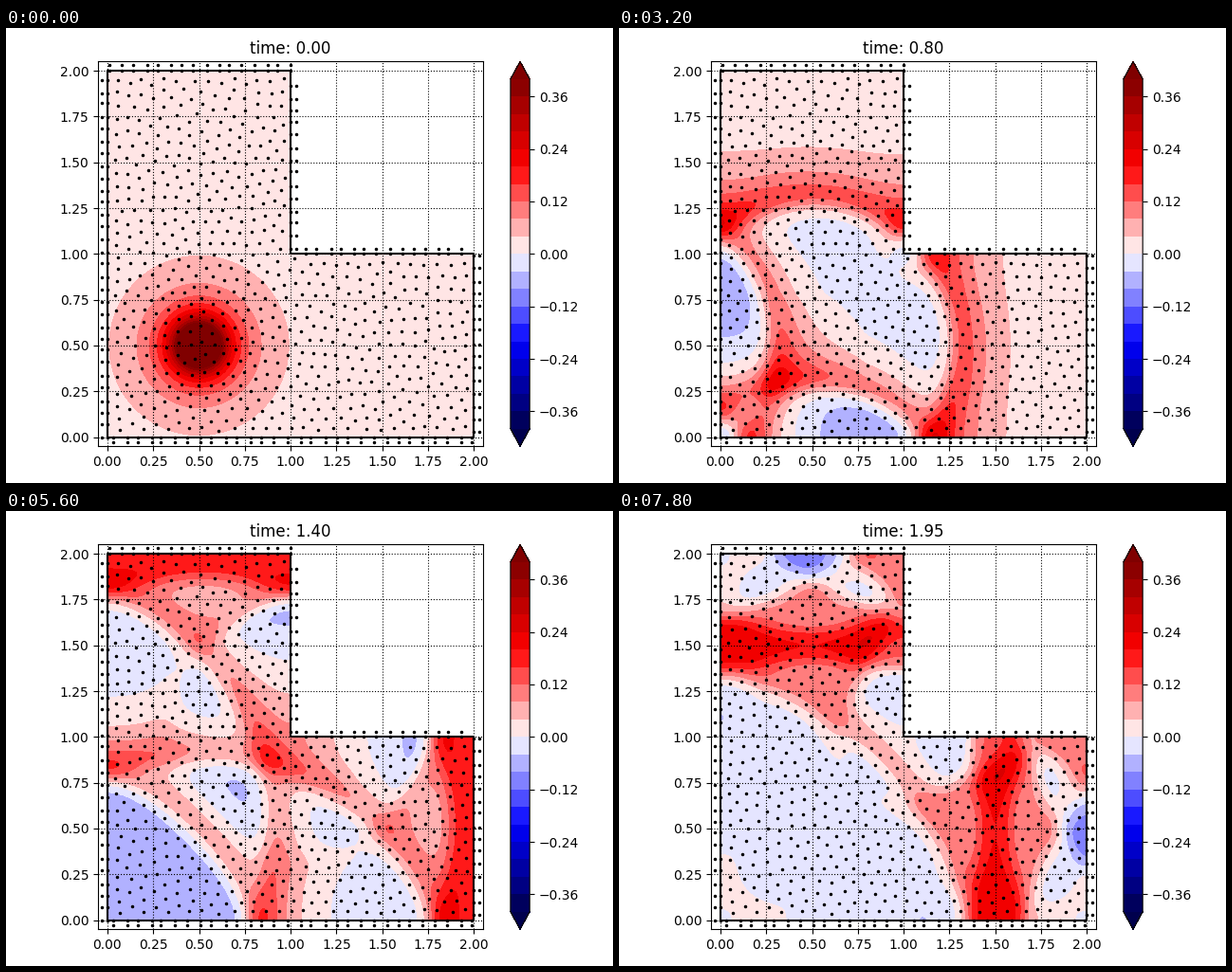
Animation of 640x480 px, one loop 8000 ms. Source, as a matplotlib script:

```python
import numpy as np
import matplotlib.pyplot as plt
from matplotlib.animation import FuncAnimation

W, H, DPI = 640, 480, 100
FRAMES, INTERVAL = 40, 200
DT_FRAME = 0.05

# Wave solver: free boundary, unit speed, vertex grid over the L-shaped domain
N = 200
STEP = 2.0 / N
SUB = 10
DT = DT_FRAME / SUB

axis = np.linspace(0, 2, N + 1)
X, Y = np.meshgrid(axis, axis)
outside = (X > 1 + STEP / 2) & (Y > 1 + STEP / 2)

cells = np.ones((N, N))
cells[N // 2:, N // 2:] = 0
padded = np.pad(cells, 1)
mass = (padded[1:, 1:] + padded[1:, :-1] + padded[:-1, 1:] + padded[:-1, :-1]) / 4
mass[mass == 0] = 1
edge_x = (padded[1:, 1:-1] + padded[:-1, 1:-1]) / 2
edge_y = (padded[1:-1, 1:] + padded[1:-1, :-1]) / 2


def laplacian(u):
    fx = edge_x * np.diff(u, axis=1)
    fy = edge_y * np.diff(u, axis=0)
    out = np.zeros_like(u)
    out[:, :-1] += fx
    out[:, 1:] -= fx
    out[:-1] += fy
    out[1:] -= fy
    return out / mass / STEP**2


def solve():
    r2 = (X - 0.5)**2 + (Y - 0.5)**2
    u = 1 / (1 + r2 / 0.1**2)
    prev = u + 0.5 * DT**2 * laplacian(u)
    fields = []
    for _ in range(FRAMES):
        fields.append(np.ma.array(u.copy(), mask=outside))
        for _ in range(SUB):
            u, prev = 2 * u - prev + DT**2 * laplacian(u), u
    return fields


# Scattered nodes: jittered boundary, ghosts just outside, relaxed interior
rng = np.random.default_rng(4)
SPACING = 0.0667


def side(start, end, normal):
    start, end = np.array(start), np.array(end)
    length = np.linalg.norm(end - start)
    n = int(round(length / SPACING)) + 1
    t = np.linspace(0, 1, n)
    t[1:-1] += rng.uniform(-0.15, 0.15, n - 2) / (n - 1)
    edge = start + t[:, None] * (end - start)
    return edge, edge + 0.029 * np.array(normal)


def inside(p):
    x, y = p[..., 0], p[..., 1]
    box = (x > 0.02) & (y > 0.02) & (x < 1.98) & (y < 1.98)
    return box & ((x < 0.98) | (y < 0.98))


def interior(edge, radius=0.052):
    pts = np.empty((3000, 2))
    n = len(edge)
    pts[:n] = edge
    for p in rng.uniform(0, 2, (24000, 2)):
        if inside(p) and ((pts[:n] - p)**2).sum(1).min() > radius**2:
            pts[n] = p
            n += 1
    pts = pts[:n]
    free = slice(len(edge), n)
    for _ in range(12):
        d = pts[free, None] - pts[None]
        r2 = (d**2).sum(2)
        r2[r2 == 0] = np.inf
        force = (d / r2[..., None]**2).sum(1) * radius**3
        move = np.clip(0.15 * radius * force, -0.008, 0.008)
        new = pts[free] + move
        pts[free] = np.where(inside(new)[:, None], new, pts[free])
    return pts[free]


sides = [
    side((0.03, 0), (1.99, 0), (0, -1)),
    side((2, 0.03), (2, 0.99), (1, 0)),
    side((1.93, 1), (1.08, 1), (0, 1)),
    side((1, 1.03), (1, 1.92), (1, 0)),
    side((1, 2), (0.01, 2), (0, 1)),
    side((0, 1.95), (0, 0), (-1, 0)),
]
edge = np.vstack([s[0] for s in sides])
ghosts = np.vstack([s[1] for s in sides])
nodes = np.vstack([interior(edge), edge, ghosts])

fields = solve()

# Layout in pixels from the top left
TOP, SIZE = 35.43, 405.8


def add_axes(left, width):
    return fig.add_axes([left / W, 1 - (TOP + SIZE) / H, width / W, SIZE / H])


fig = plt.figure(figsize=(W / DPI, H / DPI), dpi=DPI)
ax = add_axes(97.26, SIZE)
cax = add_axes(531.9, SIZE / 20)
levels = np.linspace(-0.4, 0.4, 21)


def contours(i):
    return ax.contourf(X, Y, fields[i], levels, cmap='seismic', vmin=-0.4,
                       vmax=0.4, extend='both', corner_mask=False)


current = contours(0)
bar = fig.colorbar(current, cax=cax, ticks=np.linspace(-0.36, 0.36, 7))
bar.minorticks_off()

ax.plot([0, 2, 2, 1, 1, 0, 0], [0, 0, 1, 1, 2, 2, 0], 'k-', lw=1.5)
ax.plot(nodes[:, 0], nodes[:, 1], 'k.', ms=3)
ax.grid(ls=':', color='k')
ticks = np.linspace(0, 2, 9)
ax.set(xlim=(-0.05, 2.05), ylim=(-0.05, 2.05), xticks=ticks, yticks=ticks)
title = ax.set_title('time: 0.00')


def update(i):
    global current
    current.remove()
    current = contours(i)
    title.set_text(f'time: {i * DT_FRAME:.2f}')
    return current, title


anim = FuncAnimation(fig, update, frames=FRAMES, interval=INTERVAL,
                     init_func=lambda: [], repeat=True, repeat_delay=0)
plt.show()
```
